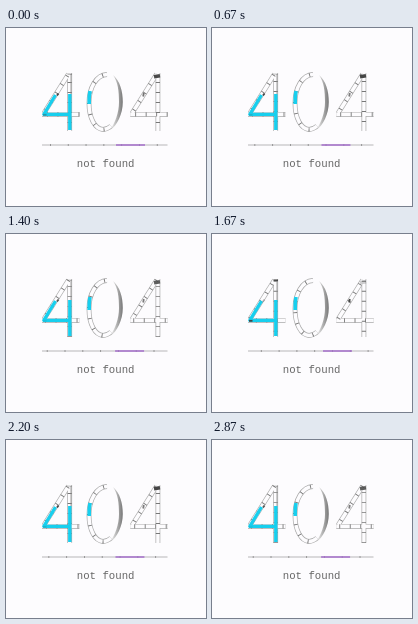
Write an HTML page that moves like this. It is 200 px wide and 178 px high and loops after 2940 ms.

```html
<!DOCTYPE html>
<html lang="en">
<meta charset="utf-8">
<title>404 not found</title>
<style>
  html, body { margin: 0; width: 100%; height: 100%; overflow: hidden; background: #fdfcfe }
  svg { display: block; width: 100vw; height: 100vh }
  path { fill: none }
  text { font: 10.7px "Liberation Mono", "Courier New", monospace; fill: #666 }
</style>
<svg viewBox="0 0 200 178">
  <linearGradient id="shade">
    <stop offset=".2" stop-color="#ddd"/>
    <stop offset="1" stop-color="#777"/>
  </linearGradient>
  <path style="fill:url(#shade)" d="M107 47C114 53 116.8 63 116.8 74C116.8 86 111 98 104 102C109 95 113 85 113 74C113 63 112 54 107 47"/>
  <g id="art"></g>
  <path id="rule" stroke="#a56fcb" stroke-width="1.5"/>
  <text x="70.8" y="139">not found</text>
</svg>
<script>
const LOOP = 2940, STEPS = 44, CYCLE = LOOP / 4;
const INK = '#777', EDGE = '#aaa', PAPER = '#fdfcfe', CYAN = '#17cfee';
const art = document.getElementById('art');
const rule = document.getElementById('rule');
const ticks = [], marks = [];

function line(d, stroke, width, extra = {}) {
  const p = document.createElementNS('http://www.w3.org/2000/svg', 'path');
  const attrs = { d, stroke, 'stroke-width': width, ...extra };
  for (const k in attrs) p.setAttribute(k, attrs[k]);
  return art.appendChild(p);
}

// Cross marks that travel one gap per cycle
function tick(d, width, gap, phase) {
  const el = line(d, INK, width, { 'stroke-dasharray': `.9 ${gap - .9}` });
  ticks.push({ el, gap, phase });
}

// Dark dash that is strongest at one moment of the cycle
function mark(d, width, peak, low) {
  marks.push({ el: line(d, '#444', width), peak, low });
}

function tubes(list) {
  list.forEach(d => line(d, EDGE, 4.8));
  list.forEach(d => line(d, PAPER, 3.4));
}

function four(x) {
  const diagonal = `M${x + 26.5} 46L${x + 2} 85`;
  const post = `M${x + 27.7} 45V103`;
  const base = `M${x} 86.3H${x + 37.5}`;
  tubes([diagonal, post, base]);
  tick(diagonal, 4, 10, 2);
  tick(post, 4.2, 10, 9);
  tick(base, 4.2, 10.5, 5);
}

four(36);
line('M65 46V102', '#888', .8);
line('M49.5 67L37.8 86.3H65', CYAN, 3.3, { 'stroke-linejoin': 'round' });
line('M63.8 66V102', CYAN, 3.4);
mark('M61.5 46.2H66', 1.6, .36, .2);
mark('M37 86.8H40.5', 1.8, .3, .1);
mark('M51 67.5L52.5 65.5', 1.8, .94, .1);

const zero = 'M101 46.5C90 47 83 60 83 75C83 90 89 101 97 101.5Q101 101.5 105 98';
tubes([zero]);
tick(zero, 4, 11, 4);
line('M84 63Q82.8 69 83.2 76', CYAN, 3.6);

four(124.2);
mark('M148 48.8L154 47.8', 3.6, .94, 0);
mark('M137.2 68.5L137.8 65', 1.8, .36, .7);

const ground = 'M36 117H161.5';
line(ground, '#999', .7);
tick(ground, 1.6, 17.8, 8);

function draw(now) {
  const t = Math.floor(now % LOOP / LOOP * STEPS) * LOOP / STEPS;
  const p = t / CYCLE % 1;
  for (const { el, gap, phase } of ticks)
    el.setAttribute('stroke-dashoffset', -(phase + p * gap));
  for (const { el, peak, low } of marks) {
    const glow = .5 + .5 * Math.cos((p - peak) * 2 * Math.PI);
    el.setAttribute('opacity', low + (1 - low) * glow);
  }
  const shift = Math.sin(p * 2 * Math.PI);
  rule.setAttribute('d', `M${110 + shift} 117H${139 + shift}`);
}

const start = performance.now();
function frame() {
  draw(performance.now() - start);
  requestAnimationFrame(frame);
}
frame();
</script>
</html>
```
